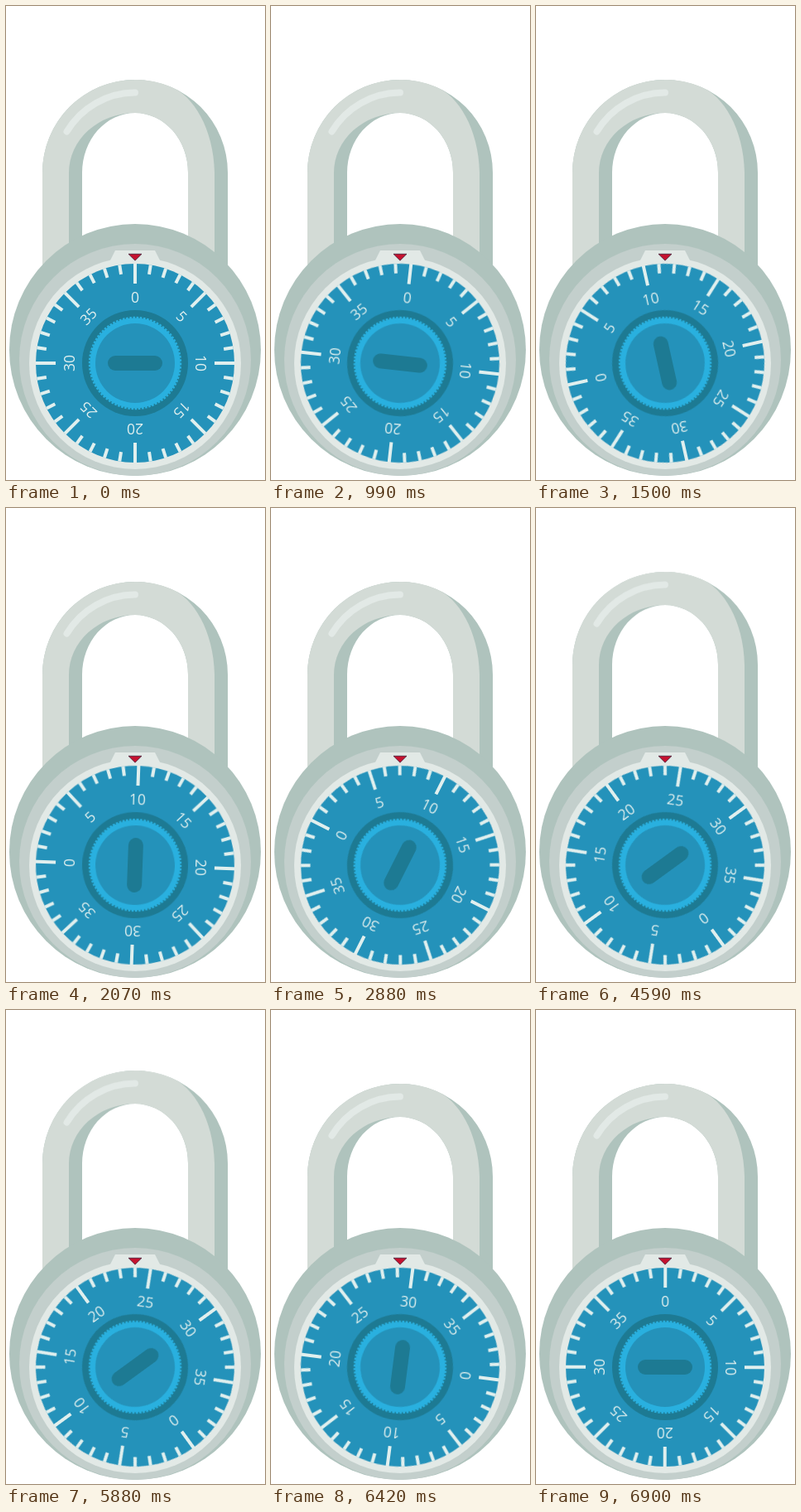
These frames come from a looping animation (313 by 572 pixels, 7.2 s). An HTML page:

```html
<!DOCTYPE html>
<html lang="en">
<head>
<meta charset="utf-8">
<title>Combination lock</title>
<style>
  html, body { margin: 0; width: 100%; height: 100%; overflow: hidden; background: #fff; }
  svg { display: block; width: 313px; height: 572px; }

  .light { fill: #d3dbd6; }
  .shade { fill: #afc3bd; }
  .bevel { fill: #c3cfcc; }
  .rim { fill: #e2e9e6; }
  .face { fill: #2492ba; }
  .deep { fill: #1d7a93; }
  .bright { fill: #29b0df; }

  .shine { fill: none; stroke: #e2e9e6; stroke-width: 8; stroke-linecap: round; }
  .grip { fill: none; stroke: #29b0df; stroke-width: 2.4; stroke-dasharray: 2.6 1.6; }
  .arrow { fill: #c4122f; stroke: #43203a; stroke-width: .8; }
  .tick { stroke: #e0efee; stroke-width: 4; }
  .number {
    fill: #e0efee;
    font: 500 17.5px "Open Sans", "Noto Sans", sans-serif;
    font-stretch: 75%;
    text-anchor: middle;
  }

  /* Each move is a cubic ease-in half followed by a cubic ease-out half. */
  #dial, #shackle {
    animation: turn 7200ms cubic-bezier(.33333, 0, .66667, 0) infinite;
  }
  #dial { transform-origin: 156px 431px; }
  #shackle { animation-name: lift; }

  @keyframes turn {
    0% { transform: rotate(0deg); }
    13.0903% { transform: rotate(319.5deg); animation-timing-function: cubic-bezier(.33333, 1, .66667, 1); }
    26.1806% { transform: rotate(639deg); }
    36.1319% { transform: rotate(243deg); animation-timing-function: cubic-bezier(.33333, 1, .66667, 1); }
    46.0833% { transform: rotate(-153deg); }
    52.6528% { transform: rotate(-4.5deg); animation-timing-function: cubic-bezier(.33333, 1, .66667, 1); }
    59.2222%, 83.4722% { transform: rotate(144deg); }
    90.0694% { transform: rotate(72deg); animation-timing-function: cubic-bezier(.33333, 1, .66667, 1); }
    96.6667%, 100% { transform: rotate(0deg); }
  }

  @keyframes lift {
    0%, 59.375% { transform: translateY(0px); }
    65.9444% { transform: translateY(-40px); animation-timing-function: cubic-bezier(.33333, 1, .66667, 1); }
    72.5139%, 74.3056% { transform: translateY(-80px); }
    80.1389% { transform: translateY(-40px); animation-timing-function: cubic-bezier(.33333, 1, .66667, 1); }
    85.9722%, 100% { transform: translateY(0px); }
  }
</style>
</head>
<body>
<svg viewBox="0 0 313 572">
  <g id="shackle">
    <path class="shade" d="M44 400V201A112 112 0 0 1 268 201V400H220V201A64 72 0 0 0 92 201V400Z"/>
    <path class="light" d="M44 400V201A112 112 0 0 1 200 98C226 108 251 148 252 201V400H220V201A64 72 0 0 0 156 129A80 72 0 0 0 76 201V400Z"/>
    <path class="shine" d="M73.5 151.5A96.5 96.5 0 0 1 156 104.5"/>
  </g>

  <circle class="shade" cx="156" cy="415" r="152"/>
  <circle class="bevel" cx="156" cy="427" r="140"/>
  <circle class="rim" cx="156" cy="431" r="128"/>
  <path class="rim" d="M132 295H180L187 309H125Z"/>

  <g id="dial">
    <circle class="face" cx="156" cy="431" r="120"/>
    <g id="scale"></g>
    <circle class="deep" cx="156" cy="431" r="64"/>
    <circle class="bright" cx="156" cy="431" r="54.5"/>
    <circle class="grip" cx="156" cy="431" r="55"/>
    <circle class="face" cx="156" cy="431" r="48"/>
    <rect class="deep" x="123" y="422" width="66" height="18" rx="9"/>
  </g>

  <path class="arrow" d="M148 299.3H164L156 307.2Z"/>
</svg>
<script>
  const scale = document.getElementById("scale");

  function add(tag, attrs, text = "") {
    const el = document.createElementNS("http://www.w3.org/2000/svg", tag);
    for (const key in attrs) el.setAttribute(key, attrs[key]);
    el.textContent = text;
    scale.append(el);
  }

  for (let n = 0; n < 40; n++) {
    const major = n % 5 === 0;
    const transform = `rotate(${n * 9} 156 431)`;
    add("line", { class: "tick", x1: 156, x2: 156, y1: 311, y2: major ? 335 : 322.5, transform });
    if (major) add("text", { class: "number", x: 156, y: 357.6, transform }, n);
  }
</script>
</body>
</html>
```
